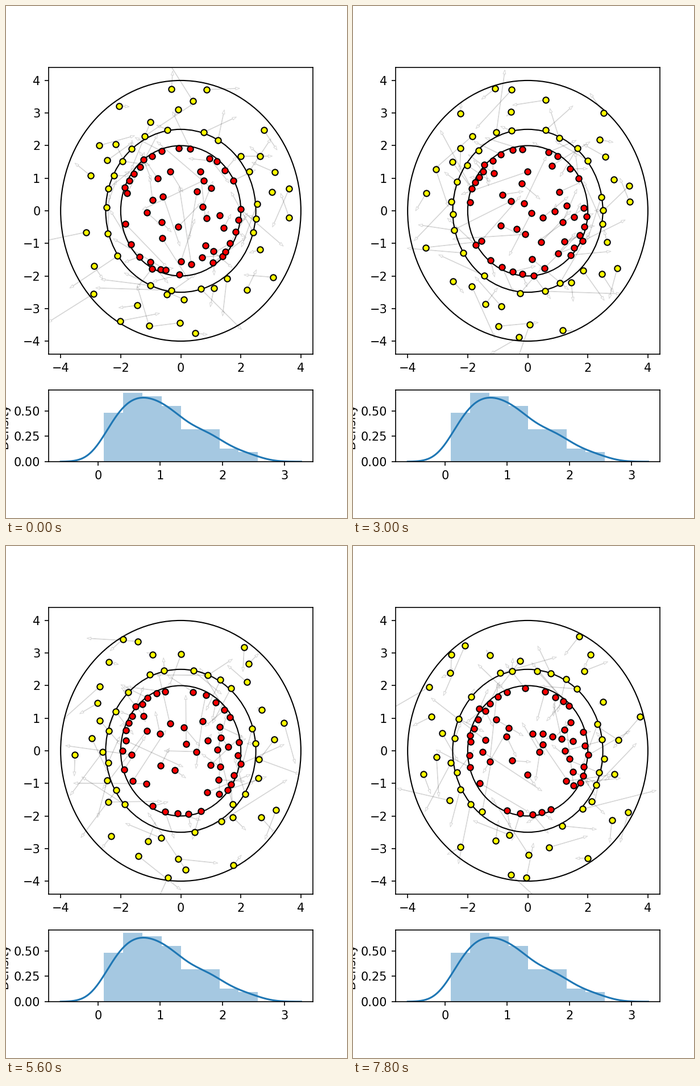
These frames come from a looping animation (600x900 px, 8 s). A matplotlib script:

```python
import numpy as np
import matplotlib.pyplot as plt
from matplotlib.animation import FuncAnimation

FRAMES, STEP = 40, 200
WARM_UP = 25
GOLDEN = np.pi * (3 - 5 ** .5)
SWIRL = .008        # shared counter-clockwise turn per frame
PACE = .04          # distance per frame at unit speed

rng = np.random.default_rng(7)

# Speeds spread evenly inside each histogram bin.
COUNTS = (15, 21, 20, 17, 10, 10, 4, 3)
LOW, WIDTH, BAND = .0916, .3103, .232
speeds = np.concatenate([LOW + WIDTH * (i + (np.arange(n) + .5) / n)
                         for i, n in enumerate(COUNTS)])
edges = LOW + WIDTH * np.arange(len(COUNTS) + 1)


def polar(radius, angle):
    return np.column_stack([radius * np.cos(angle), radius * np.sin(angle)])


def ring(count, radius):
    """Evenly spaced particles along a wall."""
    angle = 2 * np.pi * np.arange(count) / count
    return polar(radius, angle + rng.normal(0, .03, count))


def spiral(count, radius):
    """Scattered particles; radius maps 0..1 to a distance."""
    i = np.arange(count)
    return polar(radius((i + .5) / count), GOLDEN * i)


def push(pos, reach):
    """Short-range repulsion between like particles."""
    gap = pos[:, None] - pos
    dist = np.hypot(gap[..., 0], gap[..., 1]) + np.eye(len(pos))
    force = .25 * np.clip(reach - dist, 0, None) / dist
    return (gap * force[..., None]).sum(axis=1)


def simulate(bound, loose, inner, outer, wall, reach, speed):
    """Positions and velocities of one species for every frame."""
    pos = np.vstack([bound, loose])
    n, held = len(pos), np.arange(len(pos)) < len(bound)
    home = wall + rng.normal(0, .025, n)
    heading = rng.uniform(0, 2 * np.pi, n)
    track = []
    for _ in range(WARM_UP + FRAMES):
        vel = polar(speed, heading)
        track.append((pos, vel))
        pos = pos + PACE * vel + push(pos, reach)
        r, angle = np.hypot(*pos.T), np.arctan2(pos[:, 1], pos[:, 0])
        # Loose particles bounce off the walls; held ones cling to theirs.
        hit = ~held & ((r < inner) | (r > outer))
        heading = np.where(hit, 2 * angle + np.pi - heading, heading)
        jump = rng.random(n) < .08
        heading = heading + rng.normal(0, .08, n) + jump * rng.uniform(-2, 2, n)
        r = np.where(held, r + .5 * (home - r), np.clip(r, inner, outer))
        pos = polar(r, angle + SWIRL)
    return track[WARM_UP:]


pace = rng.permutation(speeds)
red = simulate(ring(29, 1.93), spiral(21, lambda u: 1.6 * np.sqrt(u)),
               0, 1.68, 1.93, .45, pace[:50])
yellow = simulate(ring(22, 2.52), spiral(28, lambda u: 2.75 + 1.15 * u),
                  2.65, 3.93, 2.52, .62, pace[50:])

fig, (ax, hist_ax) = plt.subplots(
    2, 1, figsize=(4, 6), dpi=150,
    gridspec_kw=dict(height_ratios=[4, 1], hspace=.2, left=.125, right=.9,
                     bottom=.11, top=.88))

for radius in (2, 2.5, 4):
    ax.add_patch(plt.Circle((0, 0), radius, fill=False, lw=1, zorder=2))
zeros = np.zeros(len(speeds))
arrows = ax.quiver(zeros, zeros, zeros + 1, zeros, angles="xy", units="dots",
                   scale_units="xy", scale=1, width=.6, headwidth=8,
                   headlength=12, headaxislength=12, facecolors="none",
                   edgecolors=(0, 0, 0, .16), linewidths=.5, zorder=1)
dot = dict(ls="", marker="o", ms=5, mec="k", mew=1, zorder=3)
reds, = ax.plot([], [], color="red", **dot)
yellows, = ax.plot([], [], color="yellow", **dot)
ax.set(xlim=(-4.4, 4.4), ylim=(-4.4, 4.4),
       xticks=range(-4, 5, 2), yticks=range(-4, 5))

hist_ax.hist(speeds, bins=edges, density=True, color="tab:blue", alpha=.4)
grid = np.linspace(LOW - 3 * BAND, edges[-1] + 3 * BAND, 200)
bells = np.exp(-.5 * ((grid[:, None] - speeds) / BAND) ** 2)
density = bells.mean(axis=1) / (BAND * np.sqrt(2 * np.pi))
hist_ax.plot(grid, density, color="tab:blue", lw=1.5)
hist_ax.set(xlim=(-.798, 3.459), ylim=(0, .7075), xticks=range(4),
            yticks=(0, .25, .5))
hist_ax.set_ylabel("Density", labelpad=3.5)


def update(frame):
    (red_pos, red_vel), (yellow_pos, yellow_vel) = red[frame], yellow[frame]
    reds.set_data(*red_pos.T)
    yellows.set_data(*yellow_pos.T)
    arrows.set_offsets(np.vstack([red_pos, yellow_pos]))
    arrows.set_UVC(*np.vstack([red_vel, yellow_vel]).T)
    return reds, yellows, arrows


anim = FuncAnimation(fig, update, frames=FRAMES, interval=STEP, repeat=True,
                     repeat_delay=0, init_func=lambda: update(0))
plt.show()
```
